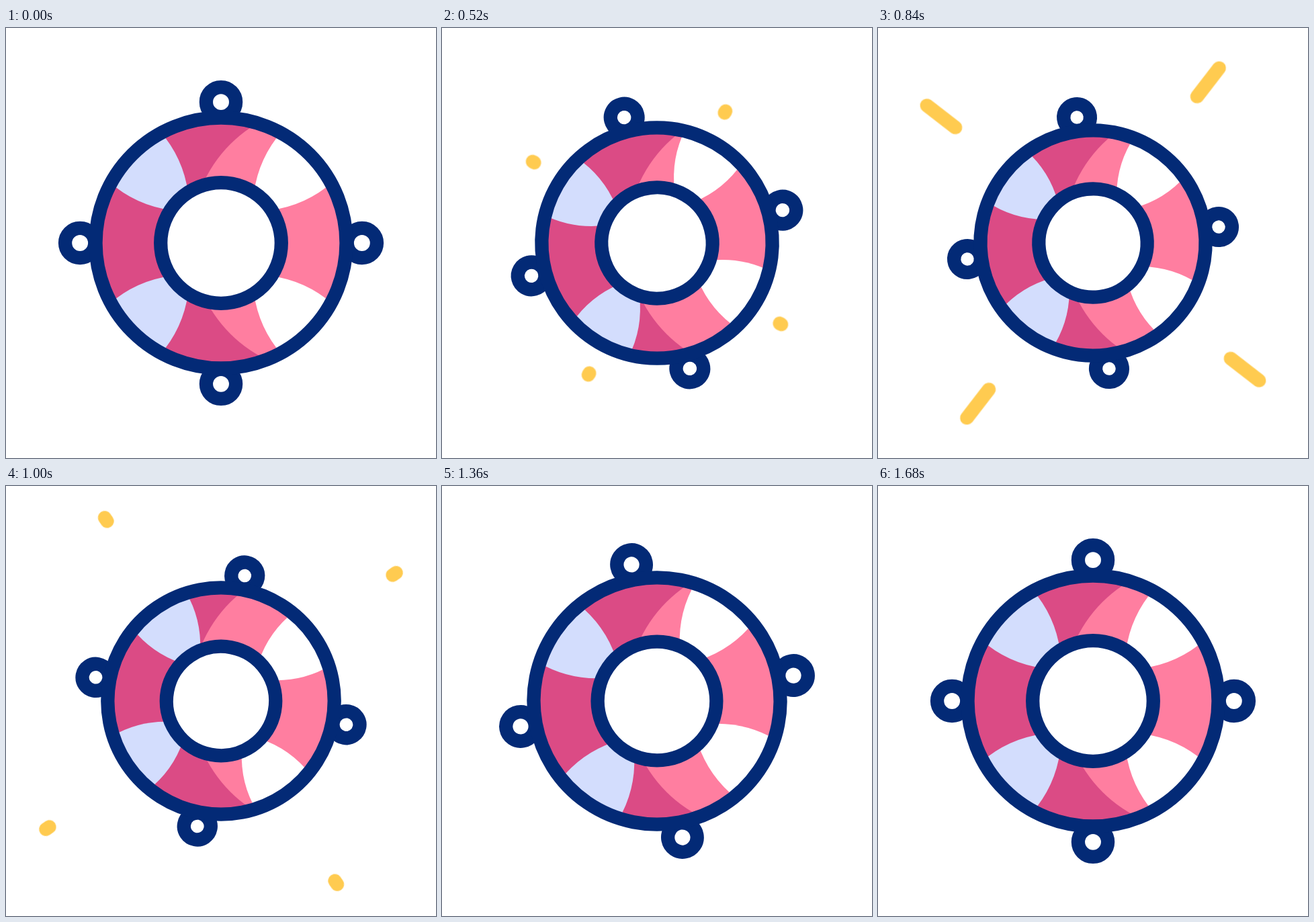
Animation of 640x640 px, one loop 1.72 s. Source, as an HTML page without scripts:

```html
<!DOCTYPE html>
<html lang="en">
<head>
<meta charset="utf-8">
<title>Lifebuoy</title>
<style>
  @property --zoom { syntax: "<number>"; inherits: true; initial-value: 1; }
  @property --turn { syntax: "<angle>"; inherits: true; initial-value: 0deg; }
  @property --tip  { syntax: "<length>"; inherits: true; initial-value: 0px; }
  @property --tail { syntax: "<length>"; inherits: true; initial-value: 0px; }

  html, body { margin: 0; width: 100%; height: 100%; overflow: hidden; background: #fff; }

  svg {
    display: block;
    width: 100%;
    height: 100%;
    animation: zoom 1.72s infinite, turn 1.72s infinite, tip 1.72s infinite, tail 1.72s infinite;
  }

  /* The outline keeps its weight while the shape scales. */
  .buoy {
    transform: scale(var(--zoom)) rotate(var(--turn));
    stroke-width: calc(20.3px / var(--zoom));
  }
  .line { fill: #fff; stroke: #032a76; }
  .shade { --band: #db4b85; --gap: #d3ddfd; }
  .light { --band: #ff7ea0; --gap: #fff; }
  .band { fill: var(--band); }
  .gap { fill: var(--gap); }

  .rays {
    stroke: #ffcb50;
    stroke-linecap: round;
    stroke-dasharray: calc(var(--tip) - var(--tail)) 300px;
    stroke-dashoffset: calc(-1 * var(--tail));
    animation: show 1.72s step-end infinite;
  }

  @keyframes zoom {
    0% { --zoom: 1; animation-timing-function: cubic-bezier(.65, 0, .35, 1); }
    48.837% { --zoom: .8985; animation-timing-function: cubic-bezier(.54, 0, .29, 1); }
    97.674%, 100% { --zoom: 1; }
  }
  @keyframes turn {
    0% { --turn: 0deg; animation-timing-function: cubic-bezier(.44, 0, .75, 1); }
    32.558% { --turn: -15deg; animation-timing-function: cubic-bezier(.64, 0, .36, 1); }
    97.674%, 100% { --turn: 90deg; }
  }
  @keyframes tip {
    0%, 27.907% { --tip: 0px; animation-timing-function: cubic-bezier(.4, 0, .6, 1); }
    48.837%, 100% { --tip: 100px; }
  }
  @keyframes tail {
    0%, 34.884% { --tail: 0px; animation-timing-function: cubic-bezier(.4, 0, .6, 1); }
    62.791%, 100% { --tail: 100px; }
  }
  @keyframes show {
    0% { opacity: 0; }
    28.5% { opacity: 1; }
    61.7%, 100% { opacity: 0; }
  }
</style>
</head>
<body>
<svg viewBox="-320 -320 640 640">
  <defs>
    <clipPath id="lit"><circle cx="155.2" cy="-6" r="199.7"/></clipPath>
    <circle id="knob" cy="-209.85" r="22.1"/>
    <path id="gap" d="M91-166.5A176 176 0 0 0 49-75L75-49A176 176 0 0 0 166.5-91Z"/>
    <path id="ray" d="M159-176L244-261" pathLength="100"/>
    <g id="stripes" class="buoy">
      <circle class="band" r="186.5"/>
      <g class="gap">
        <use href="#gap"/>
        <use href="#gap" transform="rotate(90)"/>
        <use href="#gap" transform="rotate(180)"/>
        <use href="#gap" transform="rotate(270)"/>
      </g>
    </g>
  </defs>

  <g class="buoy">
    <g class="rays">
      <use href="#ray"/>
      <use href="#ray" transform="scale(-1 1)"/>
      <use href="#ray" transform="scale(1 -1)"/>
      <use href="#ray" transform="scale(-1 -1)"/>
    </g>
    <g class="line">
      <use href="#knob"/>
      <use href="#knob" transform="rotate(90)"/>
      <use href="#knob" transform="rotate(180)"/>
      <use href="#knob" transform="rotate(270)"/>
    </g>
  </g>

  <use class="shade" href="#stripes"/>
  <g clip-path="url(#lit)"><use class="light" href="#stripes"/></g>

  <g class="buoy">
    <circle class="line" r="186.5" style="fill: none"/>
    <circle class="line" r="89.8"/>
  </g>
</svg>
</body>
</html>
```
